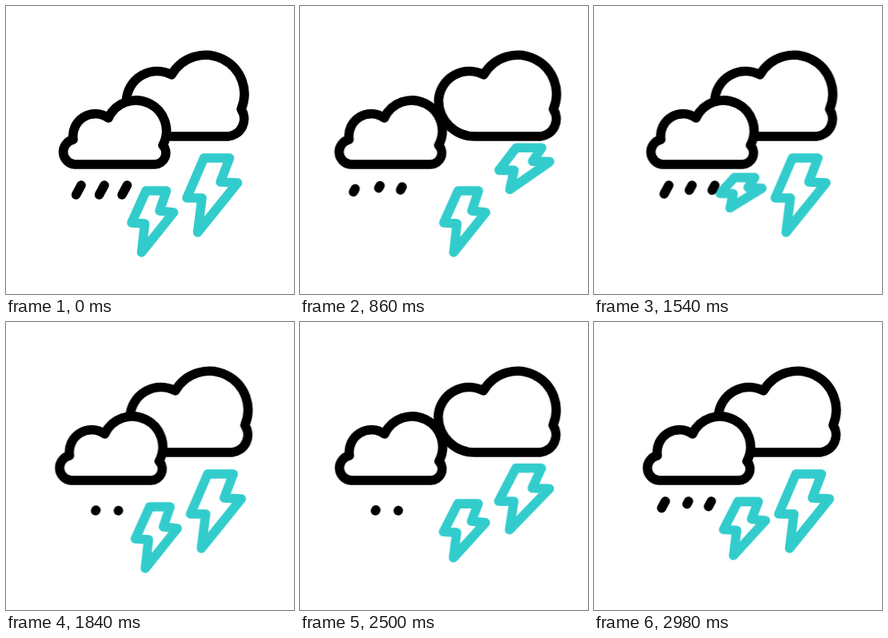
An HTML page without scripts that plays this animation: 360 px wide and 360 px high, repeating every 3 s.

```html
<!DOCTYPE html>
<html lang="en">
<head>
<meta charset="utf-8">
<title>Stormy weather</title>
<style>
  html, body { margin: 0; width: 100%; height: 100%; overflow: hidden; background: #fff; }
  svg { display: block; width: 100%; height: 100%; }
  path {
    fill: #fff;
    stroke: #000;
    stroke-width: 11.6;
    stroke-linecap: round;
    stroke-linejoin: round;
  }
  .bolt { fill: none; stroke: #33cccc; vector-effect: non-scaling-stroke; }

  .far, .near, .bolt { animation: 3s cubic-bezier(.333, 0, .667, 1) infinite; }
  .far { --drift: 1; animation-name: drift; }
  .near { --drift: -1; animation-name: drift; }
  .big {
    --down: translateY(-17px) scaleY(.42);
    --over: translateY(0) scaleY(1.14);
    transform-origin: 0 190px;
    animation-name: big;
  }
  .small {
    --down: translateY(-19px) scaleY(.4);
    --over: translateY(0) scaleY(1.117);
    transform-origin: 0 231px;
    animation-name: small;
  }

  /* The loop is cut part-way through a swing */
  @keyframes drift {
    0%, 53.67% { transform: translateX(0); }
    26.83% { transform: translateX(calc(var(--drift) * 23px)); }
    80.5% {
      transform: translateX(calc(var(--drift) * 23px));
      animation-timing-function: cubic-bezier(.333, 0, .667, .6465);
    }
    100% { transform: translateX(calc(var(--drift) * 4.21px)); }
  }
  @keyframes big {
    0%, 18.67%, 45.5%, 64%, 91%, 100% { transform: translateY(0) scaleY(1); }
    33.5%, 79% { transform: var(--down); }
    41.5%, 87% { transform: var(--over); }
  }
  @keyframes small {
    0%, 35%, 61.17%, 78.83% { transform: translateY(0) scaleY(1); }
    49.67% { transform: var(--down); }
    57.17% { transform: var(--over); }
    94.5% {
      transform: var(--down);
      animation-timing-function: cubic-bezier(.333, 0, .667, .6155);
    }
    100% { transform: translateY(-4.4px) scaleY(.951); }
  }

  /* Each drop is one dash sliding along its line, and past its end */
  .drop { fill: none; animation: 3s linear infinite; }
  .d1 { animation-name: d1; }
  .d2 { animation-name: d2; }
  .d3 { animation-name: d3; }
  @keyframes d1 {
    0%, 52%, 76% { stroke-dasharray: 10 40; stroke-dashoffset: 0; }
    15.7%, 34.7%, 59%, 82.7% { stroke-dasharray: 0 40; stroke-dashoffset: -11; animation-timing-function: step-end; }
    22.7%, 45.3%, 69.3%, 93.7% { stroke-dasharray: 0 40; stroke-dashoffset: 0; }
    28.7% { stroke-dasharray: 3.4 40; stroke-dashoffset: -3.7; }
    100% { stroke-dasharray: 8 40; stroke-dashoffset: 0; }
  }
  @keyframes d2 {
    0%, 54.7%, 77% { stroke-dasharray: 10 40; stroke-dashoffset: 0; }
    16%, 39.3%, 62.7%, 84.7% { stroke-dasharray: 0 40; stroke-dashoffset: -11; animation-timing-function: step-end; }
    26.7%, 47.7%, 70%, 97.2% { stroke-dasharray: 0 40; stroke-dashoffset: 0; }
    28.7% { stroke-dasharray: 2.6 40; stroke-dashoffset: -.4; }
    33.3% { stroke-dasharray: 5 40; stroke-dashoffset: -4; }
    100% { stroke-dasharray: 4 40; stroke-dashoffset: 0; }
  }
  @keyframes d3 {
    0%, 54.7%, 76.7% { stroke-dasharray: 10 40; stroke-dashoffset: 0; }
    12.7%, 37.3%, 62.3%, 84.3% { stroke-dasharray: 0 40; stroke-dashoffset: -11; animation-timing-function: step-end; }
    25.3%, 47.7%, 69.8%, 95.7% { stroke-dasharray: 0 40; stroke-dashoffset: 0; }
    28.7% { stroke-dasharray: 3.3 40; stroke-dashoffset: -1.7; }
    100% { stroke-dasharray: 6.5 40; stroke-dashoffset: 0; }
  }
</style>
</head>
<body>
<svg viewBox="0 0 360 360">
  <g class="far">
    <path d="M196 163A45.5 45 0 0 1 150.5 118A38.5 38.5 0 0 1 207 86A48.6 48.6 0 0 1 294 129A22 22 0 0 1 278 163Z"/>
    <path class="bolt big" d="M247.5 190H279.5L268 220L289.5 221L239.5 283L245 240H226Z"/>
    <path class="bolt small" d="M175 231H200.5L192 256L209.5 258L169.5 308L173.5 272L157 271Z"/>
  </g>
  <g class="near">
    <path d="M86 198A15.7 15.7 0 0 1 84 167A28 28 0 0 1 128 140A38.03 38.03 0 1 1 196 174A14.3 14.3 0 0 1 186 198Z"/>
    <path class="drop d1" pathLength="10" d="M94 224L87.5 236"/>
    <path class="drop d2" pathLength="10" d="M123 224L116.5 236"/>
    <path class="drop d3" pathLength="10" d="M151.5 224L145 236"/>
  </g>
</svg>
</body>
</html>
```
